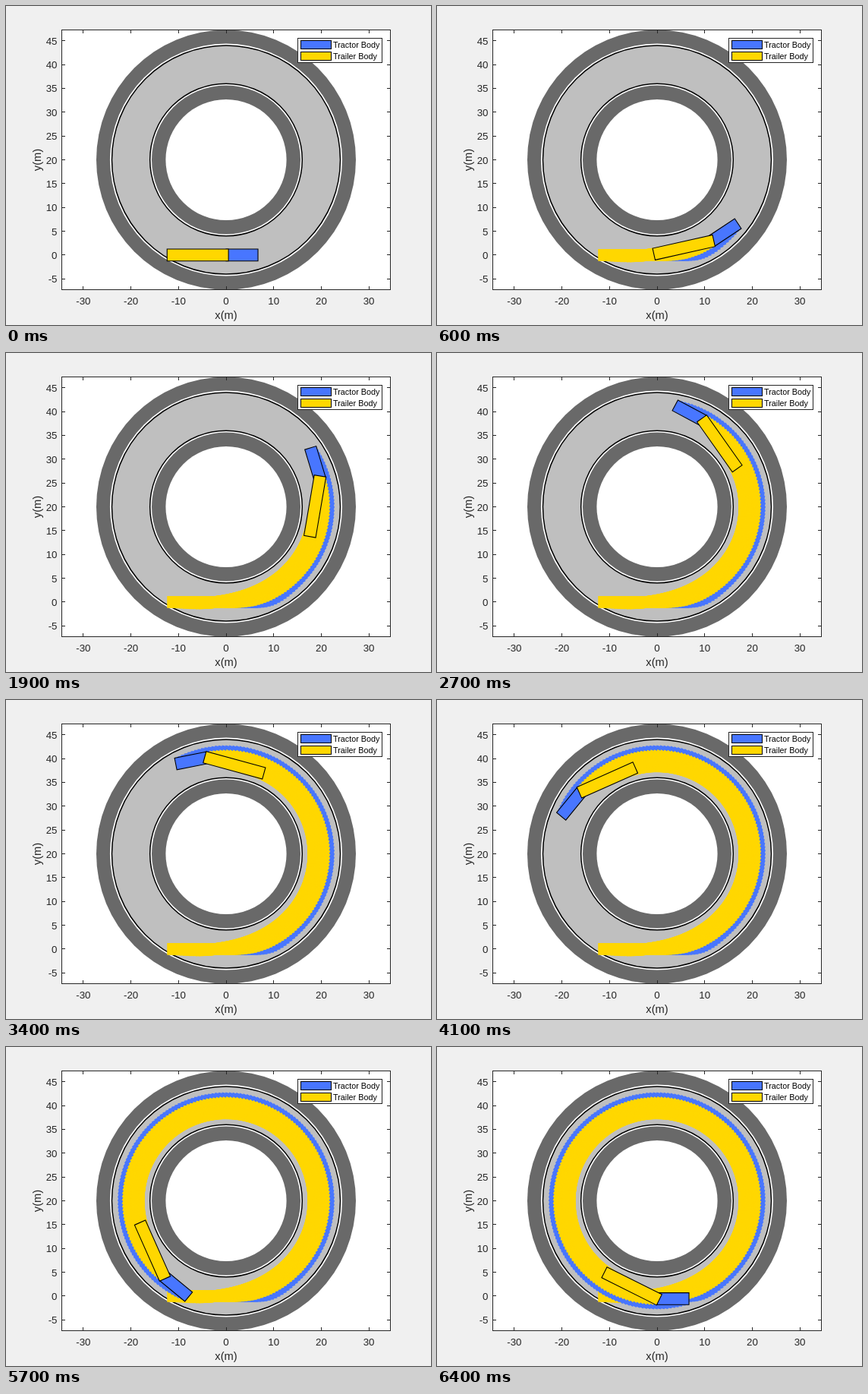
Write an HTML page with a canvas that moves like this. It is 560 px wide and 420 px high and loops after 6.5 s.

```html
<!DOCTYPE html>
<html lang="en">
<head>
<meta charset="utf-8">
<title>Tractor and trailer on a ring road</title>
<style>
  html, body { margin: 0; width: 100%; height: 100%; overflow: hidden; background: #f0f0f0; }
  canvas { display: block; }
</style>
</head>
<body>
<canvas id="stage" width="560" height="420"></canvas>
<script>
const ctx = document.getElementById('stage').getContext('2d');
const FONT = '"Liberation Sans", Arial, sans-serif';
const BLUE = '#4876ff', GOLD = '#ffd700', INK = '#262626';
const DARK = '#696969', ROAD = '#bfbfbf';

const SCALE = 6.27, CX = 290, CY = 202.5, RING_Y = 20;
const BOX = { x: 73.5, y: 31.5, w: 433, h: 342 };
const STEP_MS = 100, STEPS = 65, SUBSTEPS = 3;
const HALF_WIDTH = 1.25;

const px = x => CX + x * SCALE;
const py = y => CY - (y - RING_Y) * SCALE;

// Pose of the hitch, tractor and trailer after travelling angle a around the ring.
function pose(a) {
  const settle = Math.exp(-((a / 0.25) ** 2));
  const r = 20 + 0.57 * (1 - settle);
  const drift = 0.57 * 2 * a / 0.0625 * settle;
  const lag = 0.4643 * (1 - Math.exp(-(2.154 * a + 0.9 * a * a)));
  return {
    x: r * Math.sin(a),
    y: RING_Y - r * Math.cos(a),
    heading: a - Math.atan2(drift, r),
    trailer: a - lag
  };
}

function body(p, angle, back, front, color, outlined) {
  const c = Math.cos(angle), s = Math.sin(angle);
  const corners = [[back, -1], [front, -1], [front, 1], [back, 1]];
  ctx.beginPath();
  for (const [along, side] of corners) {
    const w = side * HALF_WIDTH;
    ctx.lineTo(px(p.x + along * c - w * s), py(p.y + along * s + w * c));
  }
  ctx.closePath();
  ctx.fillStyle = color;
  ctx.fill();
  if (outlined) {
    ctx.strokeStyle = '#000';
    ctx.lineWidth = 1.1;
    ctx.stroke();
  }
}

function vehicle(a, outlined) {
  const p = pose(a);
  body(p, p.heading, 0, 6.7, BLUE, outlined);
  body(p, p.trailer, -12.4, 0.5, GOLD, outlined);
}

function disc(r, color) {
  ctx.beginPath();
  ctx.arc(CX, CY, r, 0, 2 * Math.PI);
  ctx.fillStyle = color;
  ctx.fill();
}

function edge(r) {
  ctx.beginPath();
  ctx.arc(CX, CY, r, 0, 2 * Math.PI);
  ctx.strokeStyle = '#000';
  ctx.lineWidth = 1.5;
  ctx.stroke();
}

function ring() {
  disc(171, DARK);
  disc(153, '#fff');
  disc(150.5, ROAD);
  disc(100.3, '#fff');
  disc(98, DARK);
  disc(79.6, '#fff');
  edge(150.5);
  edge(100.3);
}

function text(str, x, y, size, align, color) {
  ctx.font = size + 'px ' + FONT;
  ctx.textAlign = align;
  ctx.fillStyle = color;
  ctx.fillText(str, x, y);
}

function line(x1, y1, x2, y2) {
  ctx.beginPath();
  ctx.moveTo(x1, y1);
  ctx.lineTo(x2, y2);
  ctx.stroke();
}

function axes() {
  const right = BOX.x + BOX.w, bottom = BOX.y + BOX.h, tick = 4.5;
  ctx.strokeStyle = INK;
  ctx.lineWidth = 1;
  ctx.strokeRect(BOX.x, BOX.y, BOX.w, BOX.h);
  for (let v = -30; v <= 30; v += 10) {
    const x = Math.floor(px(v)) + 0.5;
    line(x, bottom, x, bottom - tick);
    line(x, BOX.y, x, BOX.y + tick);
    text(v, px(v), 393, 13.33, 'center', INK);
  }
  for (let v = -5; v <= 45; v += 5) {
    const y = Math.floor(py(v)) + 0.5;
    line(BOX.x, y, BOX.x + tick, y);
    line(right, y, right - tick, y);
    text(v, 67.5, py(v) + 5, 13.33, 'right', INK);
  }
  text('x(m)', CX, 412, 14.67, 'center', INK);
  ctx.save();
  ctx.translate(45.5, CY);
  ctx.rotate(-Math.PI / 2);
  text('y(m)', 0, 0, 14.67, 'center', INK);
  ctx.restore();
}

function legendRow(label, y, color) {
  ctx.fillStyle = color;
  ctx.fillRect(388.5, y, 40, 11);
  ctx.strokeStyle = '#000';
  ctx.strokeRect(388.5, y, 40, 11);
  text(label, 431, y + 9.5, 10.8, 'left', '#000');
}

function legend() {
  ctx.lineWidth = 1;
  ctx.fillStyle = '#fff';
  ctx.fillRect(384.5, 42.5, 111, 32);
  ctx.strokeStyle = INK;
  ctx.strokeRect(384.5, 42.5, 111, 32);
  legendRow('Tractor Body', 45.5, BLUE);
  legendRow('Trailer Body', 60.5, GOLD);
}

function draw(step) {
  const turn = 2 * Math.PI / (STEPS - 1);
  ctx.fillStyle = '#f0f0f0';
  ctx.fillRect(0, 0, 560, 420);
  ctx.fillStyle = '#fff';
  ctx.fillRect(BOX.x, BOX.y, BOX.w, BOX.h);
  ctx.save();
  ctx.beginPath();
  ctx.rect(BOX.x, BOX.y, BOX.w, BOX.h);
  ctx.clip();
  ring();
  for (let i = 0; i < step * SUBSTEPS; i++) vehicle(i * turn / SUBSTEPS, false);
  vehicle(step * turn, true);
  ctx.restore();
  axes();
  legend();
}

let shown = -1;
const start = performance.now();
function tick() {
  const step = Math.floor((performance.now() - start) / STEP_MS) % STEPS;
  if (step !== shown) draw(shown = step);
  requestAnimationFrame(tick);
}
tick();
</script>
</body>
</html>
```
